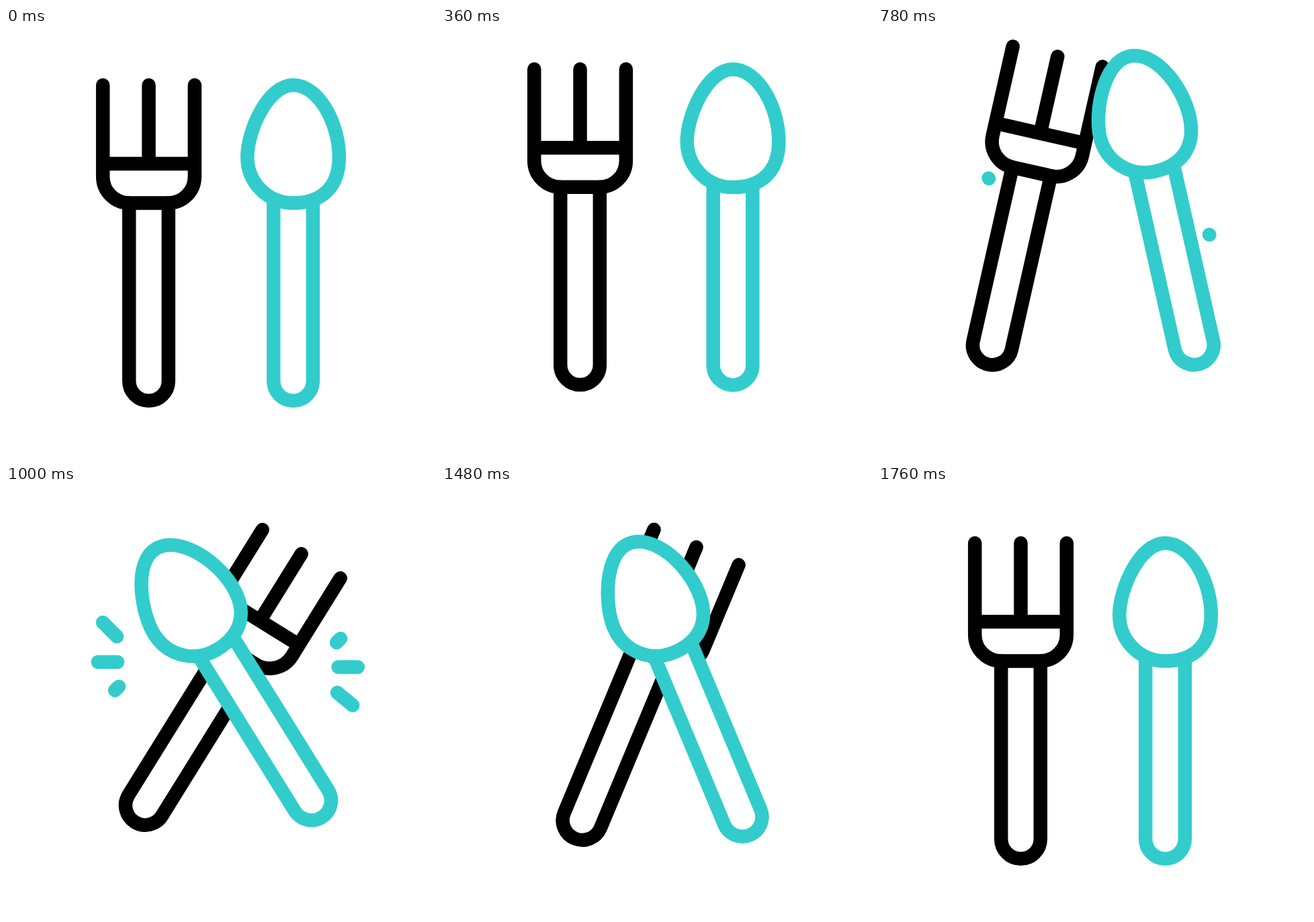
An HTML page for the animation above (2.4 s loop, 640 by 640 pixels).

```html
<!DOCTYPE html>
<html lang="en">
<head>
<meta charset="utf-8">
<title>Fork and spoon</title>
<style>
  html, body { margin: 0; width: 100%; height: 100%; overflow: hidden; background: #fff; }
  svg { display: block; width: 100vw; height: 100vh; }
  path, line { stroke-width: 20.5; }
  #fork path { fill: none; stroke: #000; stroke-linecap: round; }
  #spoon path { fill: #fff; stroke: #3cc; }
  line { stroke: #3cc; stroke-linecap: round; }
</style>
</head>
<body>
<svg viewBox="0 0 640 640">
  <g id="sparks"></g>
  <g id="fork">
    <path d="M-29.3 -59.5V205.5a29.3 29.3 0 0 0 58.6 0V-59.5"/>
    <path d="M-68.3 -235V-98.5a39 39 0 0 0 39 39H29.3a39 39 0 0 0 39 -39V-235M0 -235V-118M-68.3 -118H68.3"/>
  </g>
  <g id="spoon">
    <path d="M-29.3 -66V205.5a29.3 29.3 0 0 0 58.6 0V-66"/>
    <path d="M0 -235C38.5 -235 68.3 -177 68.3 -128S38 -59.5 0 -59.5S-68.3 -90 -68.3 -128S-38.5 -235 0 -235Z"/>
  </g>
</svg>
<script>
const NS = 'http://www.w3.org/2000/svg';
const LOOP = 2400, TILT = 32.52, LIFT = -48.1;
const byId = id => document.getElementById(id);

// Eased progress from 0 to 1 between two times
const ease = (t, start, end) => {
  const u = Math.min(1, Math.max(0, (t - start) / (end - start)));
  return u * u * (3 - 2 * u);
};

function curve(d) {
  const path = document.createElementNS(NS, 'path');
  path.setAttribute('d', d);
  const length = path.getTotalLength();
  return k => path.getPointAtLength(k * length);
}

// Each piece rises in a slight bow, then swoops to its crossed place (dx, dy)
function piece(id, x, dx, dy, turn) {
  const hx = dx / 6, hy = dy / 6;
  return {
    el: byId(id), x, dx, dy, turn,
    rise: curve(`M0 0C0 0 ${-hx} ${LIFT - hy} 0 ${LIFT}`),
    swoop: curve(`M0 ${LIFT}C${hx} ${LIFT + hy} ${dx} ${dy} ${dx} ${dy}`)
  };
}

const pieces = [
  piece('fork', 212.5, 108.5, -17.3, 1),
  piece('spoon', 427.5, -85.5, -24.8, -1)
];

function place(p, t) {
  const back = 1 - ease(t, 1320, 1760);
  const at = t < 753 ? p.rise(ease(t, 0, 753))
    : t < 1040 ? p.swoop(ease(t, 753, 1040))
    : { x: p.dx * back, y: p.dy * back };
  const angle = p.turn * TILT * ease(t, 588, 1040) * back;
  p.el.setAttribute('transform', `translate(${p.x + at.x} ${320 + at.y}) rotate(${angle})`);
}

// Inner end, outer end, order of appearance
const sparks = [
  [165, 224, 144, 203, 0], [166, 262, 136.5, 262, 1], [168, 298.5, 147, 319, 2],
  [493, 307.5, 516, 326.5, 0], [494.5, 269.5, 524, 269.5, 1], [492, 233, 513.5, 211.5, 2]
].map(([x1, y1, x2, y2, order]) => {
  const el = byId('sparks').appendChild(document.createElementNS(NS, 'line'));
  return { el, x1, y1, x2, y2, delay: order * 90 };
});

function shoot(s, t) {
  const grow = 769 + s.delay, fade = 1048 + s.delay;
  const a = ease(t, fade, fade + 150), b = ease(t, grow, grow + 150);
  const set = (end, k) => {
    s.el.setAttribute('x' + end, s.x1 + (s.x2 - s.x1) * k);
    s.el.setAttribute('y' + end, s.y1 + (s.y2 - s.y1) * k);
  };
  set(1, a);
  set(2, b);
  s.el.style.display = a < b ? '' : 'none';
}

function draw() {
  const t = performance.now() % LOOP;
  pieces.forEach(p => place(p, t));
  sparks.forEach(s => shoot(s, t));
  requestAnimationFrame(draw);
}
draw();
</script>
</body>
</html>
```
